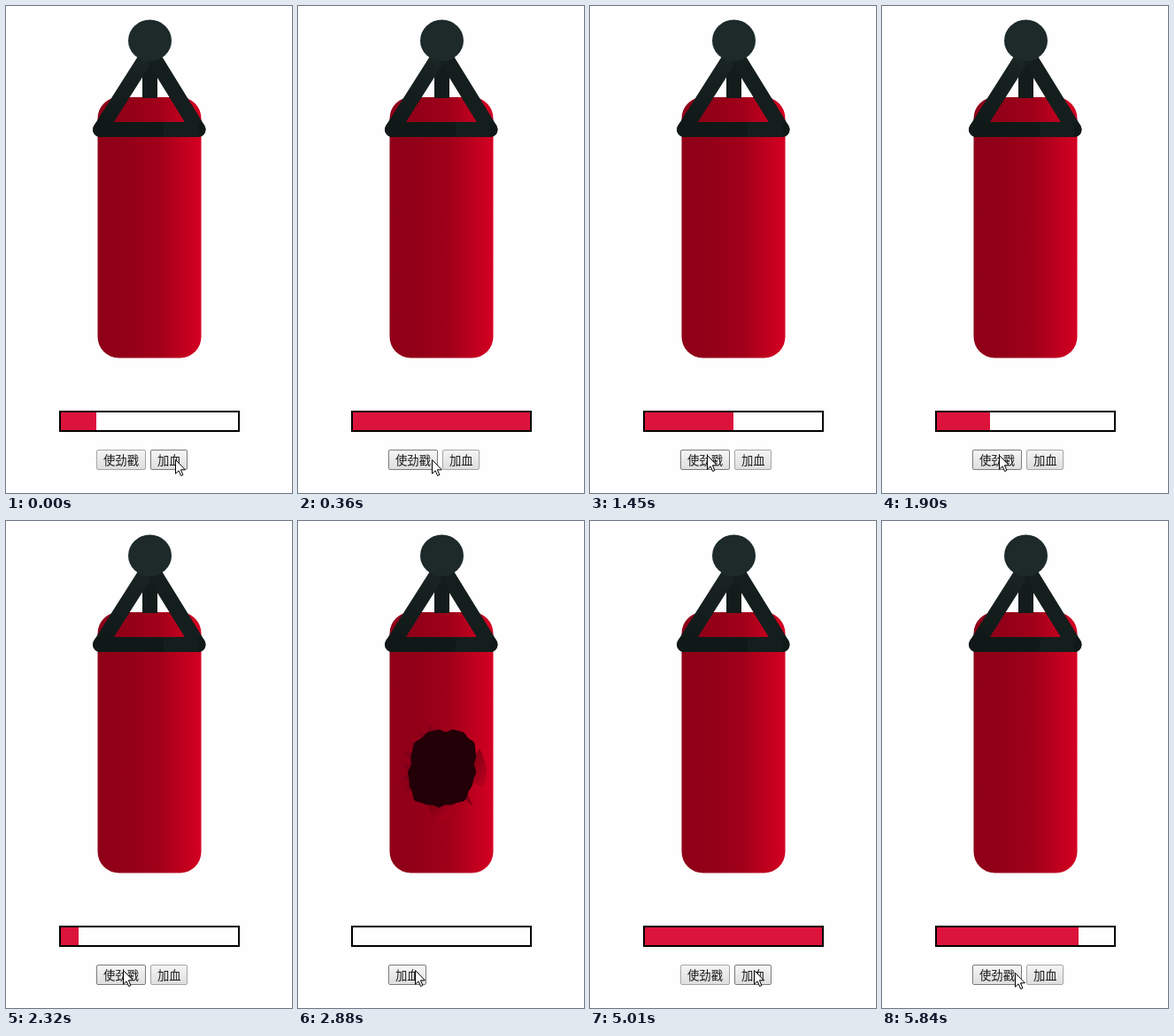
An HTML page for the animation above (5.94 s loop, 323 by 550 pixels).

```html
<!DOCTYPE html>
<html lang="zh-CN">
<head>
<meta charset="utf-8">
<style>
html, body { margin: 0; width: 100%; height: 100%; overflow: hidden; background: #fefefe; }
#stage { position: relative; width: 323px; height: 550px; overflow: hidden; }
svg { position: absolute; left: 0; top: 0; }
#bar { position: absolute; left: 60px; top: 457px; width: 200px; height: 20px; border: 2px solid #000; background: #fefefe; }
#fill { height: 100%; background: #dc143c; }
.btn {
  position: absolute; left: 102px; top: 501px; height: 23px; padding-left: 7px;
  box-sizing: border-box; border: 1px solid #a6a6a6; border-radius: 2px;
  background: linear-gradient(#f4f4f4, #dedede); color: #1a1a1a; white-space: nowrap;
  font: 13.33px/22px "Noto Sans CJK SC", "Noto Sans CJK", sans-serif;
}
.hover { border-color: #7b7b7b; background: linear-gradient(#f6f6f6, #dedede); }
.press { border-color: #a0a0a0; background: linear-gradient(#dadada, #ececec); }
</style>
</head>
<body>
<div id="stage">
  <svg width="323" height="550">
    <defs>
      <linearGradient id="skin">
        <stop offset="0" stop-color="#8e0018"/>
        <stop offset=".3" stop-color="#930018"/>
        <stop offset=".6" stop-color="#a2001a"/>
        <stop offset=".8" stop-color="#bd001e"/>
        <stop offset="1" stop-color="#d40022"/>
      </linearGradient>
      <linearGradient id="strap" gradientUnits="userSpaceOnUse" x1="106" y1="139" x2="162" y2="55">
        <stop offset="0" stop-color="#0f1817"/>
        <stop offset="1" stop-color="#1a2524"/>
      </linearGradient>
      <linearGradient id="flap" x1="0" y1="0" x2="1" y2="1">
        <stop offset="0" stop-color="#65000f"/>
        <stop offset="1" stop-color="#c1001f"/>
      </linearGradient>
    </defs>
    <rect x="103.5" y="103" width="117" height="294.5" rx="24" fill="url(#skin)"/>
    <path d="M162.5 50V104" stroke="#131c1b" stroke-width="17"/>
    <g id="hole">
      <path id="shreds" fill="#83001a"/>
      <path d="M197 266Q203 262 205 257Q213 273 213 286Q212 300 206 300L189 291Z" fill="url(#flap)"/>
      <path d="M189 302L198 323 182 308Z" fill="#85001a"/>
      <path d="M147 319L176 308 174 325Q169 335 159 341 152 338 147 319Z" fill="url(#flap)"/>
      <path id="gap" fill="#230007"/>
    </g>
    <g fill="none" stroke-width="17" stroke-linecap="round">
      <path d="M106.5 139.5L157 60" stroke="url(#strap)"/>
      <path d="M217 139.5L168 60" stroke="#141e1d"/>
      <path d="M106.5 139.5H217" stroke="#101918"/>
      <path d="M178 139.5H217" stroke="#141e1d" stroke-linecap="butt"/>
    </g>
    <ellipse cx="162.5" cy="39" rx="24.5" ry="23.5" fill="#1d2a29"/>
  </svg>
  <div id="bar"><div id="fill"></div></div>
  <div class="btn" id="poke">使劲戳</div>
  <div class="btn" id="heal">加血</div>
  <svg width="323" height="550">
    <path id="cursor" d="M.5 .5V16.2L4.1 12.8 6.6 18.5 8.9 17.5 6.4 11.8H11.4Z" fill="#fff" stroke="#000"/>
  </svg>
</div>
<script>
const LOOP = 5940, TICK = 141, LEAD = 101, FULL = 10;
const $ = id => document.getElementById(id);

// the pointer rests here from the given tick on
const stops = [
  [0, 191, 512], [3, 151, 512], [5, 132, 507], [26, 131, 512],
  [31, 149, 513], [33, 176, 473], [36, 185, 507], [38, 150, 510]
];
// ticks at which the mouse button is released
const clicks = [2, 6, 8, 9, 10, 11, 12, 14, 15, 17, 21, 29, 40, 42];

// Resting point, or halfway to the next one on the tick before arrival
function pointerAt(tick) {
  const [, x, y] = stops.filter(s => s[0] <= tick).pop();
  const next = stops.find(s => s[0] === tick + 1);
  return next ? [Math.round((x + next[1]) / 2), Math.round((y + next[2]) / 2)] : [x, y];
}

// Each click heals fully or takes one point, depending on the button under it
function healthAt(tick) {
  return clicks.filter(c => c <= tick).reduce((health, c) =>
    health === 0 || pointerAt(c)[0] >= 163 ? FULL : health - 1, 2);
}

function setButton(el, left, width, [x, y], down) {
  const over = x >= left && x < left + width && y >= 501 && y < 524;
  el.style.left = left + "px";
  el.style.width = width + "px";
  el.className = "btn" + (over ? (down ? " press" : " hover") : "");
}

function draw(t) {
  const tick = Math.floor((t + LEAD) / TICK);
  const health = healthAt(tick), broken = health === 0;
  const pointer = pointerAt(tick);
  const down = clicks.includes(tick + 1) && !clicks.includes(tick);

  $("fill").style.width = health / FULL * 100 + "%";
  $("hole").style.display = broken ? "" : "none";
  $("poke").style.display = broken ? "none" : "";
  setButton($("poke"), 102, 56, pointer, down);
  setButton($("heal"), broken ? 102 : 163, broken ? 43 : 42, pointer, down);
  $("cursor").setAttribute("transform", `translate(${pointer})`);
}

// Ragged outline around the hole's centre, leaning right at the top
function rim(a, size) {
  return [163 + 39 * size * Math.cos(a) - 4 * Math.sin(a), 279 + 45 * size * Math.sin(a)];
}

function ring(count, from, to, size) {
  const points = Array.from({ length: count }, (_, i) => {
    const a = from + (to - from) * i / count;
    return rim(a, size(a, i));
  });
  return "M" + points.join("L") + "Z";
}

$("gap").setAttribute("d", ring(72, 0, 2 * Math.PI,
  a => 1 - .05 * Math.cos(4 * a) + .025 * Math.sin(9 * a) + .02 * Math.sin(17 * a)));
$("shreds").setAttribute("d", ring(16, 2.5, 4.7, (a, i) => i % 2 ? 1.2 : .95));

const start = performance.now();
function frame() {
  draw((performance.now() - start) % LOOP);
  requestAnimationFrame(frame);
}
frame();
</script>
</body>
</html>
```
